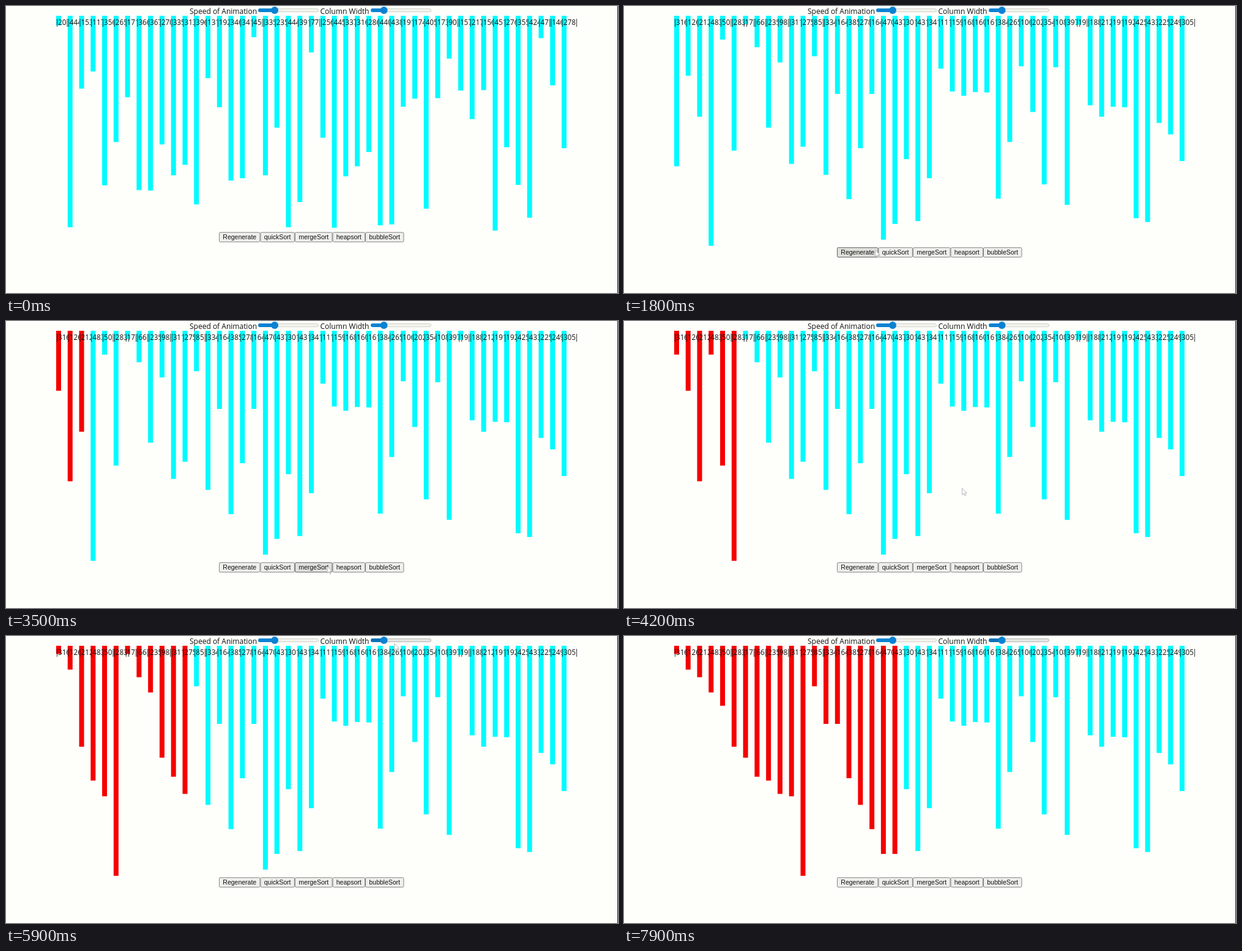
Write an HTML page that moves like this. It is 1000x470 px and loops after 8000 ms.

```html
<!DOCTYPE html>
<html lang="en">
<head>
<meta charset="utf-8">
<title>Sorting visualiser</title>
<style>
  html, body { margin: 0; width: 100%; height: 100%; overflow: hidden; background: #fefefb; }
  svg { display: block; width: 1000px; height: 470px; }
  text { white-space: pre; }
  .title { font: 12px "Open Sans", "Noto Sans", sans-serif; fill: #111; }
  .label { font: 11.7px "Open Sans", "Noto Sans", sans-serif; fill: #111; }
  .button text { font: 10.5px "Liberation Sans", Arial, sans-serif; fill: #111; }
  .button rect { fill: #efefec; stroke: #858580; }
  .button.hover rect { fill: #e0e0dc; stroke: #60605c; }
  .track { fill: #f3f3ee; stroke: #d0d0c8; }
  .fill, .thumb { fill: #0a82d2; }
  .hover .track { fill: #e4e4e2; stroke: #b4b4b0; }
  .hover .fill { fill: #0a70b4; }
</style>
</head>
<body>
<svg id="stage" viewBox="0 0 1000 470"></svg>
<script>
const LOOP = 8000, REGENERATE = 1400, SORT = 3335, WRITE = 75;
const COUNT = 45, SCALE = 0.78, TOP = 16, LEFT = 82, PITCH = 18.77, BAR = 8;

// The array that is shown and sorted; the opening one is random.
const sorted = [316, 126, 212, 483, 50, 283, 17, 66, 235, 98, 311, 275, 85, 334, 164, 385,
  278, 164, 470, 437, 301, 431, 341, 111, 159, 168, 160, 161, 384, 265, 106, 202, 354, 108,
  397, 19, 188, 212, 191, 192, 425, 433, 225, 249, 305];
const opening = randomArray(7, 20, 480);

// Key points of the pointer: time, x, y
const path = [
  [0, 1002, 400], [700, 409, 399], [2300, 411, 400], [3150, 480, 418], [3330, 525, 402],
  [3700, 525, 402], [5000, 608, 15], [6700, 657, 10], [7500, 618, 7]
];

const stage = document.getElementById('stage');

function randomArray(seed, min, max) {
  return Array.from({ length: COUNT }, () => {
    seed = (seed * 16807) % 2147483647;
    return Math.round(min + (max - min) * seed / 2147483647);
  });
}

function add(parent, tag, attrs, content) {
  const node = document.createElementNS('http://www.w3.org/2000/svg', tag);
  for (const name in attrs) node.setAttribute(name, attrs[name]);
  if (content !== undefined) node.textContent = content;
  parent.appendChild(node);
  return node;
}

// Merge sort in two beats per element: redden the compared columns, then write the smaller.
function mergeSteps(values) {
  const a = values.slice(), steps = [];
  let reach = 0;
  const record = () => steps.push({ values: a.slice(), reach });
  function merge(lo, mid, hi) {
    const copy = a.slice();
    let i = lo, j = mid + 1;
    for (let n = lo; n <= hi; n++) {
      reach = Math.max(reach, Math.min(j, hi) + 1);
      record();
      const takeLeft = j > hi || (i <= mid && copy[i] <= copy[j]);
      a[n] = takeLeft ? copy[i++] : copy[j++];
      record();
    }
  }
  (function sort(lo, hi) {
    if (lo >= hi) return;
    const mid = (lo + hi) >> 1;
    sort(lo, mid);
    sort(mid + 1, hi);
    merge(lo, mid, hi);
  })(0, a.length - 1);
  return steps;
}

function makeColumns(values) {
  const group = add(stage, 'g', {});
  const bars = values.map((value, i) => {
    const x = LEFT + i * PITCH;
    const bar = add(group, 'rect', { x, y: TOP, width: BAR });
    const label = add(group, 'text', { class: 'label', y: 30.5 });
    const digits = String(value);
    add(label, 'tspan', { x: x + 1.5, 'text-anchor': 'middle' }, '|');
    add(label, 'tspan', { x: x + 3, 'text-anchor': 'start' }, digits);
    add(label, 'tspan', { x: x + 4.5 + digits.length * 6.69, 'text-anchor': 'middle' }, '|');
    return bar;
  });
  const bottom = TOP + Math.max(...values) * SCALE;
  return { group, bars, bottom };
}

function drawColumns(columns, values, reach) {
  columns.bars.forEach((bar, i) => {
    bar.setAttribute('height', values[i] * SCALE);
    bar.setAttribute('fill', i < reach ? '#f40000' : '#00fbff');
  });
}

function makeSlider(x, thumb) {
  const group = add(stage, 'g', {});
  add(group, 'rect', { class: 'track', x: x + 0.5, y: 4.5, width: 98, height: 5, rx: 2.5 });
  add(group, 'rect', { class: 'fill', x, y: 4, width: thumb - x, height: 6, rx: 3 });
  add(group, 'circle', { class: 'thumb', cx: thumb, cy: 7, r: 6 });
  return { group, x, end: x + 99 };
}

function makeButton(name, x) {
  const group = add(row, 'g', { class: 'button' });
  const box = add(group, 'rect', { x: x + 0.5, y: 0.5, height: 15.5, rx: 1.5 });
  const text = add(group, 'text', { x: x + 6.3, y: 12 }, name);
  const width = text.getComputedTextLength() + 12.6;
  box.setAttribute('width', width - 1);
  return { group, x, end: x + width };
}

const before = makeColumns(opening), after = makeColumns(sorted);
const steps = mergeSteps(sorted);
drawColumns(before, opening, 0);

add(stage, 'text', { class: 'title', x: 300, y: 13.2 }, 'Speed of Animation');
add(stage, 'text', { class: 'title', x: 513.5, y: 13.2 }, 'Column Width');
const sliders = [makeSlider(412, 439), makeSlider(596, 617.5)];

const row = add(stage, 'g', {});
const buttons = [];
let edge = 348;
for (const name of ['Regenerate', 'quickSort', 'mergeSort', 'heapsort', 'bubbleSort']) {
  const button = makeButton(name, edge);
  buttons.push(button);
  edge = button.end;
}

add(stage, 'rect', { x: 999, y: 0, width: 1, height: 470, fill: '#222' });
const cursor = add(stage, 'path', {
  d: 'M0 0V11L2.6 8.6L4.4 12.4L6 11.7L4.3 8H7.8Z',
  fill: '#fefefe', stroke: '#a5a5a0', 'stroke-width': 0.8
});

function pointAt(t) {
  const k = path.findIndex(p => p[0] > t);
  if (k < 0) return path[path.length - 1].slice(1);
  const [t0, x0, y0] = path[k - 1], [t1, x1, y1] = path[k];
  const u = (t - t0) / (t1 - t0), e = u * u * (3 - 2 * u);
  return [x0 + (x1 - x0) * e, y0 + (y1 - y0) * e];
}

function hover(parts, x, y, top, bottom) {
  for (const part of parts) {
    const over = x >= part.x && x < part.end && y >= top && y < bottom;
    part.group.classList.toggle('hover', over);
  }
}

function draw(t) {
  const columns = t < REGENERATE ? before : after;
  before.group.style.display = columns === before ? '' : 'none';
  after.group.style.display = columns === after ? '' : 'none';
  const step = t < SORT
    ? { values: sorted, reach: 0 }
    : steps[Math.floor((t - SORT) / WRITE * 2)];
  drawColumns(after, step.values, step.reach);

  const rowTop = columns.bottom + 2.5;
  row.setAttribute('transform', `translate(0 ${rowTop})`);

  const [x, y] = pointAt(t);
  hover(buttons, x, y, rowTop, rowTop + 16);
  hover(sliders, x, y, 0, 14);
  cursor.setAttribute('transform', `translate(${x} ${y})`);
  cursor.style.display = t < path[path.length - 1][0] ? '' : 'none';
}

const start = performance.now();
function tick() {
  draw((performance.now() - start) % LOOP);
  requestAnimationFrame(tick);
}
tick();
</script>
</body>
</html>
```
